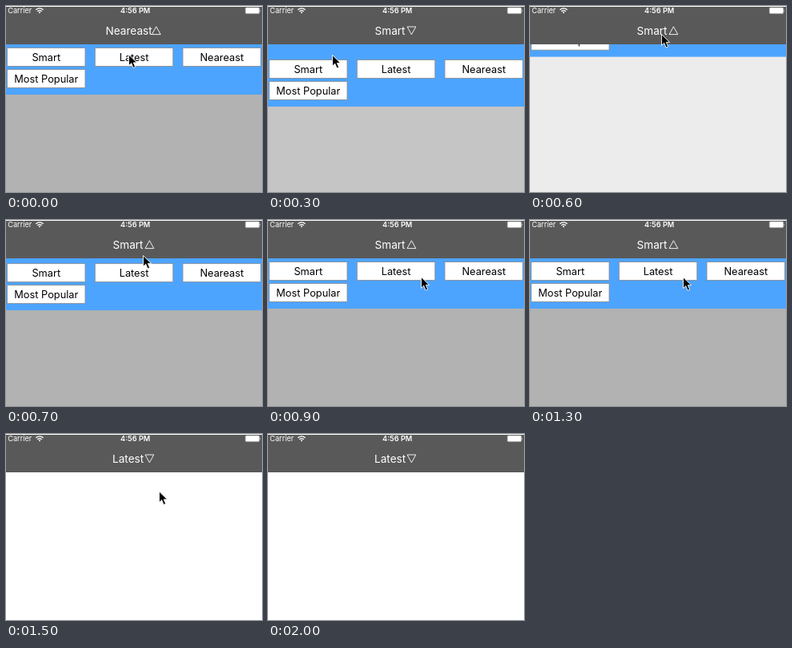
Write an HTML page that moves like this. It is 320 px wide and 233 px high and loops after 2.4 s.

```html
<!DOCTYPE html>
<html lang="en">
<head>
<meta charset="utf-8">
<title>Drop-down menu</title>
<style>
  html, body { margin: 0; width: 100%; height: 100%; overflow: hidden; background: #fff; }
  svg { display: block; width: 100vw; height: 100vh; }
  text { font-family: Inter, Roboto, "Liberation Sans", sans-serif; }
  .status { fill: #fff; font-size: 9.2px; }
  .title { fill: #fff; font-size: 13.6px; }
  .button rect { fill: #fff; stroke: #8a8f96; stroke-width: .9; }
  .button text { font-size: 12.8px; text-anchor: middle; }
</style>
</head>
<body>
<svg viewBox="0 0 320 233" preserveAspectRatio="none">
  <defs>
    <clipPath id="below"><rect y="48" width="320" height="185"/></clipPath>
  </defs>
  <rect width="320" height="233" fill="#fff"/>
  <g id="menu" clip-path="url(#below)">
    <rect id="shade" y="48" width="320" height="185"/>
    <rect id="panel" y="48" width="320" fill="#4da4ff"/>
    <g id="buttons"></g>
  </g>

  <rect y="1" width="320" height="47" fill="#595959"/>
  <text class="status" x="2.2" y="9.3">Carrier</text>
  <g fill="none" stroke="#fff" stroke-width="1.3">
    <path d="M37.3 4.8Q42 .8 46.7 4.8M39.2 6.8Q42 4.4 44.8 6.8"/>
    <path d="M40.6 7.8Q42 6.8 43.4 7.8L42 9.4Z" fill="#fff" stroke="none"/>
  </g>
  <text class="status" x="161.7" y="9.3" font-weight="600" text-anchor="middle">4:56 PM</text>
  <rect x="299.3" y="2" width="17.4" height="7.6" rx="1.4" fill="#fff" stroke="#aaa" stroke-width=".6"/>
  <path d="M317.4 4.4q1.4 1.4 0 2.8z" fill="#fff"/>

  <text id="title" class="title" y="35.6"></text>
  <path id="arrow" fill="none" stroke="#fff" stroke-width=".9"/>

  <path id="cursor" d="M.5 .5V14.3L3.7 11.2L6.1 17L8.7 15.9L6.3 10.4H10.6Z"
        fill="#000" stroke="#fff" stroke-width=".9" stroke-linejoin="round"/>
</svg>
<script>
const LOOP = 2400, TICK = 100;
const REST = 63, SHADE = .3;
const $ = id => document.getElementById(id);

// Left edge of the text, left edge of the arrow
const titles = {
  Neareast: [124.5, 181.6],
  Smart: [133.5, 173.2],
  Latest: [133, 173.2]
};

const buttons = [
  ["Smart", 1.5, 52.5],
  ["Latest", 111.3, 52.5],
  ["Neareast", 221, 52.5],
  ["Most Popular", 1.5, 79.5]
];

// When each title takes over, and which way its arrow points
const states = [
  [0, "Neareast", "up"],
  [255, "Smart", "down"],
  [580, "Smart", "up"],
  [1355, "Latest", "down"]
];

// Pointer path: time, x, y
const path = [
  [0, 153, 60.5],
  [100, 128, 62],
  [200, 88, 63],
  [300, 80, 61],
  [400, 80, 60],
  [600, 164, 35],
  [700, 171, 44],
  [900, 191, 71],
  [1500, 191, 71.5],
  [1700, 191, 105],
  [2000, 188, 240]
];

const last = (list, t) => list.findLast(item => item[0] <= t);

function pointer(t) {
  const from = last(path, t);
  const to = path.find(p => p[0] > t) || from;
  const k = to === from ? 0 : (t - from[0]) / (to[0] - from[0]);
  return [1, 2].map(i => from[i] + (to[i] - from[i]) * k);
}

// Damped spring from 0 to 1 with a slight overshoot
function spring(ms) {
  const decay = .031 * ms, turn = .0314 * ms;
  return 1 - Math.exp(-decay) * (Math.cos(turn) + Math.sin(turn));
}

// Panel offset from rest and share of the shade, by time since the state began
function opening(ms) {
  const k = spring(ms);
  return [(k - 1) * REST, Math.min(1, k)];
}

function closing(ms) {
  const p = Math.min(1, ms / 140);
  const fade = p * p * (3 - 2 * p);
  return [15 * Math.sin(Math.PI * Math.min(1, p * 1.5)) - REST * Math.max(0, p * 1.5 - .5), 1 - fade];
}

function arrowPath(x, dir) {
  const [base, tip] = dir === "up" ? [35.6, 25.8] : [26, 35.8];
  return `M${x + .8} ${base}H${x + 11.6}L${x + 6.2} ${tip}Z`;
}

function draw(t) {
  const [begun, title, dir] = last(states, t);
  const [textX, arrowX] = titles[title];
  const [offset, shade] = begun === 0 ? [0, 1]
    : dir === "up" ? opening(t - begun) : closing(t - begun);
  const [x, y] = pointer(t);
  $("title").textContent = title;
  $("title").setAttribute("x", textX);
  $("arrow").setAttribute("d", arrowPath(arrowX, dir));
  $("menu").style.display = shade > 0 ? "" : "none";
  $("panel").setAttribute("height", Math.max(0, REST + offset));
  $("buttons").setAttribute("transform", `translate(0 ${offset})`);
  $("shade").setAttribute("fill-opacity", SHADE * shade);
  $("cursor").setAttribute("transform", `translate(${x} ${y})`);
}

$("buttons").innerHTML = buttons.map(([label, x, y]) =>
  `<g class="button"><rect x="${x}" y="${y}" width="97.5" height="23"/>
   <text x="${x + 48.8}" y="${y + 16.2}">${label}</text></g>`).join("");

const start = performance.now();
function frame(now) {
  const t = Math.max(0, now - start) % LOOP;
  draw(Math.floor(t / TICK) * TICK);
  requestAnimationFrame(frame);
}
frame(start);
</script>
</body>
</html>
```
